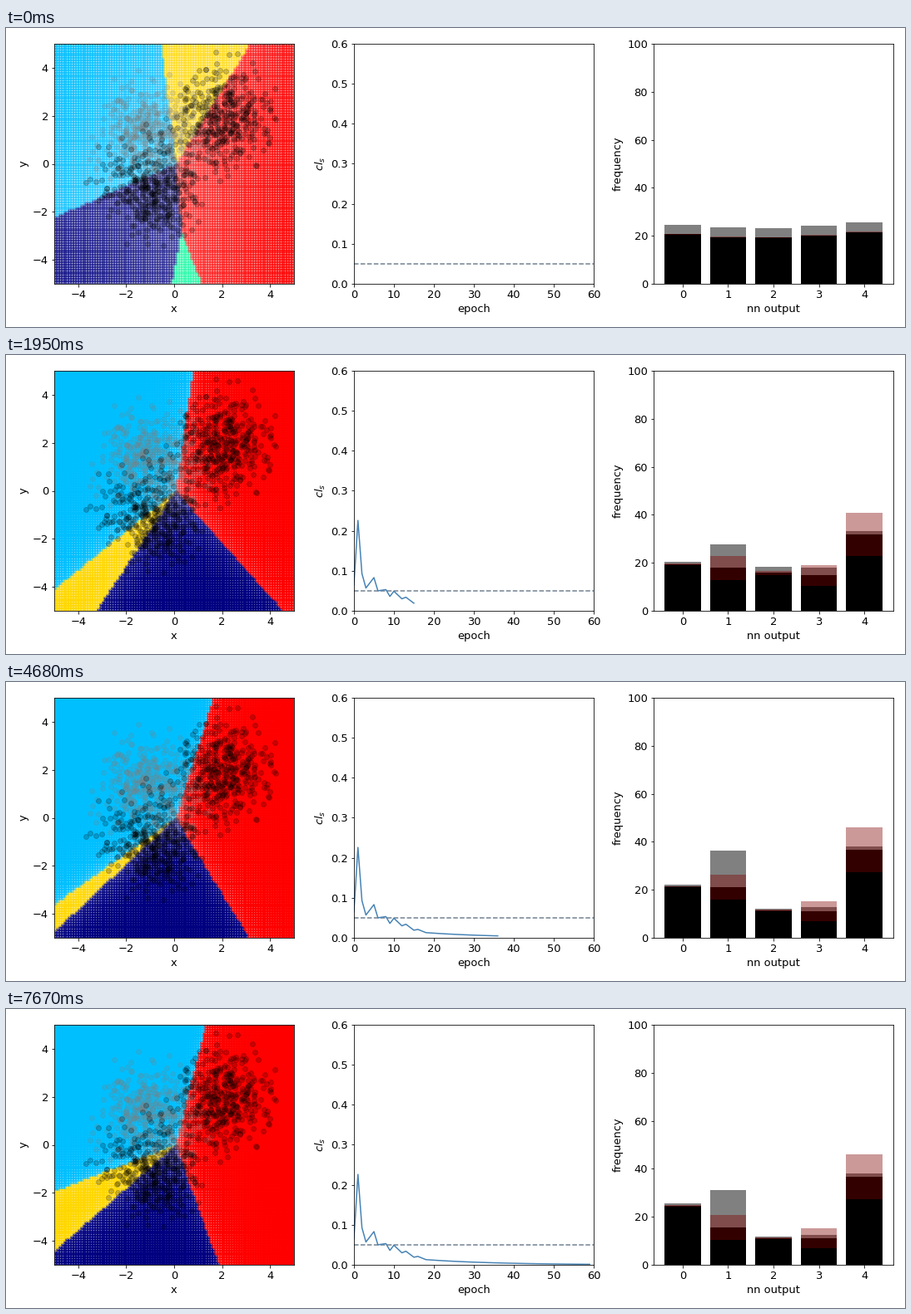
Write a matplotlib script that moves like this. It is 1080 px wide and 360 px high and loops after 7.8 s.

```python
import numpy as np
import matplotlib.pyplot as plt
from matplotlib.animation import FuncAnimation
from matplotlib.colors import to_rgb

EPOCHS = 60
STEP_MS = 130
WIDTH, HEIGHT, DPI = 1080, 360, 72

RED, SKY, GOLD, GREEN, NAVY = range(5)
NAMES = ["red", "deepskyblue", "gold", "mediumspringgreen", "navy"]
COLORS = np.array([to_rgb(name) for name in NAMES])
CENTRE = np.array([0.08, 0.0])
SETTLED = 20  # from here on only four classes remain


def fan_weights(sharp, order, ends, slopes, apex=None):
    """Linear class scores whose borders are rays through the given ends."""
    rays = np.array(ends, float)
    rays /= np.linalg.norm(rays, axis=1, keepdims=True)
    slopes = np.array(slopes)
    slopes = slopes - np.linalg.pinv(rays.T) @ (rays.T @ slopes)
    turns = slopes[:, None] * np.column_stack([-rays[:, 1], rays[:, 0]])
    w = np.zeros((5, 3))
    for a, b, turn in zip(order, order[1:], turns):
        w[b, :2] = w[a, :2] + sharp * turn
    if GREEN not in order:
        w[GREEN] = (w[RED] + w[SKY]) / 2
        w[GREEN, 2] = -3
    if apex is not None:
        w[GREEN, 2] = (w[RED, :2] - w[GREEN, :2]) @ (apex - CENTRE)
    w[:, :2] -= w[:, :2].mean(axis=0)
    return w


def settled_weights(n):
    """Four regions whose borders drift slowly."""
    t = n - SETTLED
    ends = [(1.15 + 0.45 * np.sin(np.pi * t / 42), 5),
            (-5, -4.7 + 0.072 * t),
            (-5, -4.3 - 1.4 * np.exp(-t / 12)),
            (3.95 - 0.055 * t, -5)]
    return fan_weights(2 + t / 80, (RED, SKY, GOLD, NAVY), ends,
                       (1, .35, .35, .6))


# Early poses: sharpness, classes counter-clockwise, border ends, slopes.
POSES = {
    0: fan_weights(0.16, (RED, GOLD, SKY, NAVY, GREEN),
                   [(3.1, 5), (-.6, 5), (-5, -2.2), (-.4, -2.2), (.85, -2.2)],
                   (1.6, .7, 1, .9, .8), apex=(.3, -2.8)),
    4: fan_weights(0.42, (RED, SKY, GOLD, GREEN, NAVY),
                   [(2.3, 5), (-5, 3.2), (-5, .5), (.3, -5), (5, -4.25)],
                   (1, .8, .6, .7, 1)),
    11: fan_weights(0.7, (RED, GREEN, SKY, GOLD, NAVY),
                    [(.9, 5), (-.15, 5), (-5, -3.5), (-2.3, -5), (5, -5)],
                    (1, 1.3, 1, .8, 1.4)),
    SETTLED: settled_weights(SETTLED),
}


def weights(n):
    if n >= SETTLED:
        return settled_weights(n)
    a = max(k for k in POSES if k <= n)
    b = min(k for k in POSES if k > n)
    t = (n - a) / (b - a)
    return (1 - t) * POSES[a] + t * POSES[b]


edges = np.linspace(-5, 5, 101)
mids = (edges[1:] + edges[:-1]) / 2
GX, GY = np.meshgrid(mids - CENTRE[0], mids - CENTRE[1])
GRID = np.stack([GX, GY, np.ones_like(GX)], axis=-1)


def regions(n):
    """Colour of the winning class, as opaque as its probability."""
    score = GRID @ weights(n).T
    winner = score.argmax(axis=-1)
    ranked = np.sort(score, axis=-1)
    best, lead = ranked[..., -1], ranked[..., -1] - ranked[..., -2]
    extra = np.where(np.isin(winner, (SKY, GOLD)), min(n / 25, 2), 0)
    others = np.exp(ranked[..., :-1] - (best + extra * lead)[..., None])
    return np.dstack([COLORS[winner], 1 / (1 + others.sum(axis=-1))])


def blob(rng, mean, count=400, reach=2.8):
    pts = rng.normal(size=(2 * count, 2))
    return pts[np.hypot(*pts.T) < reach][:count] + mean


def settle(n, start, end, span):
    return end + (start - end) * np.exp(-(n / span) ** 2)


def yields(n):
    """Background, signal and band half-width of the five bars."""
    back = np.array([
        np.interp(n, [0, 20, 59], [20.6, 19, 24.6]),
        np.interp(n, [0, 11, 33, 59], [19.5, 17, 21.8, 15.7]),
        settle(n, 19.3, 11.1, 20),
        settle(n, 20.2, 11, 16),
        settle(n, 21.5, 36.7, 14),
    ])
    signal = settle(n, 4, np.array([1, 15.6, .7, 1.5, 1.3]),
                    np.array([6, 18, 20, 24, 9]))
    spike = n / 4 * np.exp(1 - n / 4)
    half = (settle(n, .2, np.array([.3, 5.2, .4, 4.2, 9.2]), 8)
            + spike * np.array([.1, .3, 2, 1.2, 0]))
    return back, signal, half


def loss_curve():
    n = np.arange(EPOCHS)
    keys = [(0, .065), (1, .226), (2, .093), (3, .057), (5, .083), (6, .05),
            (8, .053), (9, .036), (10, .049), (12, .03), (13, .034),
            (15, .019), (16, .021), (18, .013)]
    early = np.interp(n, *zip(*keys))
    return np.where(n <= 18, early, .013 * np.exp(-(n - 18) / 18))


rng = np.random.default_rng(4)
blobs = [("grey", blob(rng, (-1, 1.3))),
         ("black", blob(rng, (2, 2))),
         ("black", blob(rng, (-1, -1)))]
loss = loss_curve()

plt.rcParams["font.size"] = 13
fig, (ax_map, ax_loss, ax_bar) = plt.subplots(
    1, 3, figsize=(WIDTH / DPI, HEIGHT / DPI), dpi=DPI)
fig.subplots_adjust(left=58 / WIDTH, right=1066 / WIDTH,
                    bottom=1 - 308 / HEIGHT, top=1 - 19 / HEIGHT,
                    wspace=72 / 288)

mesh = ax_map.pcolormesh(edges, edges, regions(0), edgecolors="face",
                         linewidth=0.2)
for color, pts in blobs:
    ax_map.scatter(*pts.T, color=color, alpha=0.2)
ax_map.set(xlim=(-5, 5), ylim=(-5, 5), xlabel="x", ylabel="y",
           xticks=range(-4, 5, 2), yticks=range(-4, 5, 2))

ax_loss.axhline(0.05, color="slategray", linestyle="--")
curve, = ax_loss.plot([], [], color="steelblue")
ax_loss.set(xlim=(0, 60), ylim=(0, 0.6), xlabel="epoch", ylabel="$cl_s$",
            xticks=range(0, 61, 10))

slots = np.arange(5)
back_bars = ax_bar.bar(slots, np.ones(5), color="black")
sig_bars = ax_bar.bar(slots, np.ones(5), color="grey")
band_bars = ax_bar.bar(slots, np.ones(5), color="maroon", alpha=0.4)
ax_bar.set(xlim=(-.64, 4.64), ylim=(0, 100), xlabel="nn output",
           ylabel="frequency", xticks=slots)


def set_bars(bars, low, height):
    for bar, y, h in zip(bars, low, height):
        bar.set_y(y)
        bar.set_height(h)


def update(n):
    mesh.set_array(regions(n))
    curve.set_data(np.arange(n + 1), loss[:n + 1])
    back, signal, half = yields(n)
    set_bars(back_bars, 0 * back, back)
    set_bars(sig_bars, back, signal)
    set_bars(band_bars, back - half, 2 * half)
    return [mesh, curve, *back_bars, *sig_bars, *band_bars]


anim = FuncAnimation(fig, update, frames=EPOCHS, interval=STEP_MS,
                     init_func=lambda: update(0), repeat=True,
                     repeat_delay=0, blit=False)
plt.show()
```
